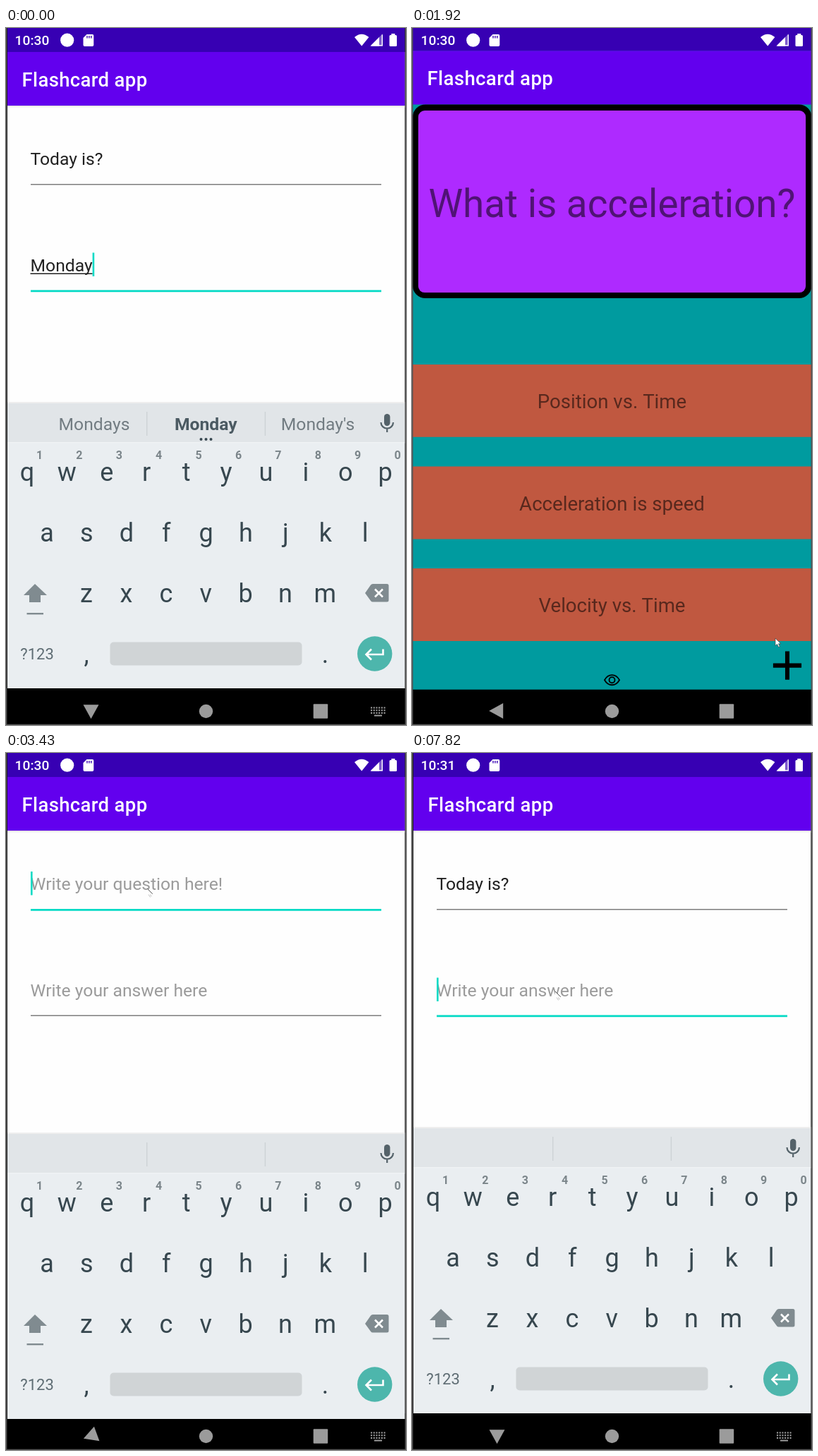
An HTML page with a canvas for the animation above (8 s loop, 567x988 px).

```html
<!DOCTYPE html>
<html lang="en">
<head>
<meta charset="utf-8">
<title>Flashcard app</title>
<style>
  html, body { margin: 0; width: 100%; height: 100%; overflow: hidden; background: #000; }
  canvas { display: block; }
</style>
</head>
<body>
<canvas id="stage" width="567" height="988"></canvas>
<script>
const ctx = document.getElementById('stage').getContext('2d');
const LOOP = 8000;
const KEY_PITCH = 56.4, KEY_COLOR = '#37474f', ICON_GRAY = '#808b90', NAV_GRAY = '#9b9b9b';
const ACCENT = '#03dac5', DIM_TEXT = 'rgba(0,0,0,.54)';

// Each step changes part of the state and holds until the next one.
const steps = [
  [0, { screen: 'edit', zoom: 1, homeZoom: 1, keyboard: 0, backAngle: -90, clock: '10:30',
        question: 'Today is?', answer: 'Monday', focus: 'answer', caret: true,
        words: ['Mondays', 'Monday', "Monday's"], pointer: null, card: '#9f26ea' }],
  [150, { screen: 'home', keyboard: null, backAngle: 0, pointer: [527, 896] }],
  [1640, { card: '#ae2aff' }],
  [1920, { homeZoom: 1.004, pointer: [515, 865], question: '', answer: '', focus: null, caret: false, words: [] }],
  [2070, { screen: 'edit', zoom: .991, homeZoom: 1.047, pointer: [430, 609] }],
  [2190, { zoom: 1, pointer: [370, 510] }],
  [2360, { pointer: [305, 390] }],
  [2530, { pointer: [260, 300] }],
  [2700, { pointer: [228, 238] }],
  [2860, { pointer: [207, 203] }],
  [3010, { pointer: [200, 192] }],
  [3150, { focus: 'question', caret: true }],
  [3430, { keyboard: 8, backAngle: -20 }],
  [3600, { keyboard: 0, backAngle: -85 }],
  [3720, { backAngle: -90, caret: false }],
  [4130, { caret: true }],
  [4390, { question: 'T' }],
  [4520, { words: ['To', 'T', 'The'] }],
  [5050, { question: 'To', caret: false, words: ['Two', 'To', 'Too'] }],
  [5170, { caret: true }],
  [5315, { question: 'Tod' }],
  [5460, { words: ['Todd', 'Tod', 'Today'] }],
  [5605, { question: 'Toda' }],
  [5750, { question: 'Today', words: ['Todays', 'Today', "Today's"] }],
  [5895, { question: 'Today ' }],
  [6040, { words: ['the', 'is', 'for'] }],
  [6580, { question: 'Today i', caret: false, words: ['is', 'I', 'in'] }],
  [6720, { question: 'Today is', caret: true, words: ['its', 'is', 'isn'] }],
  [6870, { question: 'Today is?', words: [] }],
  [7150, { pointer: [200, 210] }],
  [7285, { pointer: [201, 255] }],
  [7420, { pointer: [202, 305] }],
  [7550, { pointer: [203, 335] }],
  [7685, { pointer: [203, 338], clock: '10:31' }],
  [7820, { focus: 'answer' }]
];

function stateAt(time) {
  return Object.assign({}, ...steps.filter(([start]) => start <= time).map(([, change]) => change));
}

function box(x, y, w, h, color, radius = 0) {
  ctx.fillStyle = color;
  ctx.beginPath();
  ctx.roundRect(x, y, w, h, radius);
  ctx.fill();
}

function disc(x, y, r, color) {
  ctx.fillStyle = color;
  ctx.beginPath();
  ctx.arc(x, y, r, 0, 7);
  ctx.fill();
}

function shape(d, color) {
  ctx.fillStyle = color;
  ctx.fill(new Path2D(d));
}

function line(d, color, width) {
  ctx.strokeStyle = color;
  ctx.lineWidth = width;
  ctx.stroke(new Path2D(d));
}

function text(string, x, y, size, color, align = 'left', weight = 400) {
  ctx.font = `${weight} ${size}px Roboto, sans-serif`;
  ctx.textAlign = align;
  ctx.fillStyle = color;
  ctx.fillText(string, x, y);
}

function scaled(factor, draw) {
  ctx.save();
  ctx.translate(283.5, 494);
  ctx.scale(factor, factor);
  ctx.translate(-283.5, -494);
  draw();
  ctx.restore();
}

function appWindow(background) {
  box(2, 0, 563.5, 988, '#000');
  box(2, 34, 563.5, 902, background);
  box(2, 0, 563.5, 34, '#3700b3');
  box(2, 34, 563.5, 76, '#6200ee');
  ctx.letterSpacing = '0.34px';
  text('Flashcard app', 22.6, 82.6, 27.5, '#fff', 'left', 500);
  ctx.letterSpacing = '0px';
}

function homeScreen(state) {
  appWindow('#009b9f');
  box(2, 110, 563.5, 273.5, '#000', 18);
  box(10, 118.5, 547, 257, state.card, 9);
  text('What is acceleration?', 283.5, 268.5, 54.6, DIM_TEXT, 'center');
  ['Position vs. Time', 'Acceleration is speed', 'Velocity vs. Time'].forEach((label, i) => {
    box(2, 477 + 144 * i, 563.5, 102.5, '#c05840');
    text(label, 283.5, 539 + 144 * i, 27.5, DIM_TEXT, 'center');
  });
  line('M511 902H551M531 882V922', '#000', 6);
  line('M273 922.5Q277 915.5 283.5 915.5T294 922.5Q290 929.5 283.5 929.5T273 922.5Z', '#000', 1.8);
  line('M287.5 922.5a4 4 0 1 1-8 0a4 4 0 1 1 8 0', '#000', 1.8);
}

function field(value, hint, y, focused, caret) {
  const left = 34.5;
  text(value || hint, left, y + 194.3, 24.7, value ? '#212121' : '#9b9b9b');
  if (focused) {
    box(35, y + 221, 497, 2.8, ACCENT);
    const word = value.match(/\w*$/)[0];
    const end = left + (value ? ctx.measureText(value).width : .5);
    const wordWidth = ctx.measureText(word).width;
    if (word) box(end - wordWidth, y + 197, wordWidth, 1.4, '#212121');
    if (caret) box(end, y + 168, 2.6, 33.5, ACCENT);
  } else {
    box(35, y + 221, 497, 1.4, '#7d7d7d');
  }
}

function editScreen(state) {
  appWindow('#fefefe');
  box(2, 110, 563.5, 1.2, '#dcdcdc');
  box(2, 111.2, 563.5, 1.5, '#f3f3f3');
  field(state.question, 'Write your question here!', 0, state.focus === 'question', state.caret);
  field(state.answer, 'Write your answer here', 150.5, state.focus === 'answer', state.caret);
  shape('M14 876.5H52L62 886.5V923.5Q62 927.5 58 927.5H14Q10 927.5 10 923.5V880.5Q10 876.5 14 876.5Z', '#000');
  box(16, 882.4, 28.5, 11.2, '#fefefe');
  disc(36, 913.2, 8.6, '#fefefe');
  disc(531, 902, 28.5, '#000');
  line('M518.5 889.5L543.5 914.5M543.5 889.5L518.5 914.5', '#fefefe', 5.6);
}

function keyRow(letters, x, y) {
  [...letters].forEach((letter, i) => text(letter, x + KEY_PITCH * i, y, 36, KEY_COLOR, 'center'));
}

function keyboard(offset, words) {
  ctx.save();
  ctx.translate(0, offset);
  box(2, 530, 563.5, 2, '#eeeeee');
  box(2, 532, 563.5, 456, '#000');
  box(2, 532, 563.5, 404, '#eaeef1');
  box(2, 532, 563.5, 55, '#e1e5e8');
  box(2, 587, 563.5, 1.5, '#f0f3f5');
  [199, 366.7].forEach(x => box(x, 544, 1.4, 34, '#cdd2d5'));
  words.forEach((word, i) => {
    const middle = i === 1;
    text(word, [125, 283.3, 442][i], 570, 24.7, middle ? '#4b5a62' : '#727c82', 'center', middle ? 700 : 400);
  });
  if (words.length) [276.5, 283.5, 290.5].forEach(x => disc(x, 583, 2, KEY_COLOR));

  box(536, 547, 8.4, 17, '#546269', 4.2);
  line('M531.5 559a8.7 8.7 0 0 0 17.4 0M540.2 567V573', '#546269', 2.2);

  keyRow('qwertyuiop', 30, 642);
  keyRow('asdfghjkl', 58, 728);
  keyRow('zxcvbnm', 114, 814);
  [...'1234567890'].forEach((digit, i) =>
    text(digit, 47.5 + KEY_PITCH * i, 611, 16, '#7b858a', 'center', 700));

  shape('M41 788L58 804H49V814H33V804H25Z', ICON_GRAY);
  box(29.5, 829, 23.5, 2.4, ICON_GRAY);
  shape('M509 801L517 789.5Q518 788 520 788H540Q542.5 788 542.5 790.5V811Q542.5 813.5 540 813.5H520Q518 813.5 517 812Z', ICON_GRAY);
  line('M523 795.5L534 806.5M534 795.5L523 806.5', '#fff', 2.6);
  text('?123', 44, 895, 22, '#5f6d74', 'center');
  text(',', 114, 900, 36, KEY_COLOR, 'center');
  text('.', 452.5, 900, 36, KEY_COLOR, 'center');
  box(147.5, 870.5, 272, 33, '#d0d4d6', 5);
  disc(522.7, 887, 24.7, '#4db6ac');
  line('M534.5 880.5V888H511M518 880.5L510.5 888L518 895.5', '#fff', 2.6);
  ctx.restore();
}

function navigationIcons(state) {
  ctx.save();
  ctx.translate(120.5, 968);
  ctx.rotate(state.backAngle * Math.PI / 180);
  shape('M-11.3 0L8.7 -11V11Z', NAV_GRAY);
  ctx.restore();
  disc(283.5, 968.5, 9.7, NAV_GRAY);
  box(435.7, 958.3, 20.5, 20.5, NAV_GRAY, 1);
  if (state.keyboard === null) return;
  for (let row = 0; row < 3; row++)
    for (let col = 0; col < 6; col++)
      box(517 + 3.7 * col, 962.5 + 3.7 * row, 2.1, 2.1, NAV_GRAY);
  box(522, 973.6, 11, 2, NAV_GRAY);
}

function statusIcons(clock) {
  text(clock, 12.6, 24.3, 19.2, '#fff', 'left', 500);
  disc(86.7, 17.2, 9.6, '#fff');
  shape('M114.5 9H122.5Q124.3 9 124.3 11V24Q124.3 26 122.3 26H111.5Q109.5 26 109.5 24V14Z', '#fff');
  [114.3, 117.2, 120.1].forEach(x => box(x, 11, 1.4, 3.6, '#3700b3'));
  shape('M494 13Q504 4.5 514.4 13L504.2 25.5Z', '#fff');
  shape('M534 8V25.5H516.5Z', 'rgba(255,255,255,.35)');
  shape('M529 13V25.5H516.5Z', '#fff');
  line('M533.3 9.5V24.8H518', '#fff', 1.4);
  box(543.5, 10, 10.5, 16, '#fff', 1.5);
  box(546.3, 8, 5, 3, '#fff');
}

function mousePointer([x, y], outlined) {
  ctx.save();
  ctx.translate(x, y);
  const arrow = 'M0 0V10.5L2.6 8.4L4.6 12.6L6.3 11.8L4.5 7.8H7.8Z';
  shape(arrow, '#fff');
  if (outlined) {
    line(arrow, '#333', .6);
  } else {
    line('M0 0L7.8 7.8', '#555', 1);
    line('M2 8.5L4.5 12.5M4.5 8.5L6 11.5', '#b0b0b0', .8);
  }
  ctx.restore();
}

function draw(time) {
  const state = stateAt(time);
  box(0, 0, 567, 988, '#000');
  if (state.screen === 'home') {
    scaled(state.homeZoom, () => homeScreen(state));
  } else {
    if (state.zoom < 1) {
      scaled(state.homeZoom, () => homeScreen(state));
      box(0, 0, 567, 988, 'rgba(0,0,0,.32)');
    }
    scaled(state.zoom, () => editScreen(state));
    if (state.keyboard !== null) keyboard(state.keyboard, state.words);
  }
  statusIcons(state.clock);
  navigationIcons(state);
  if (state.pointer) mousePointer(state.pointer, state.screen === 'home');
  line('M.7 0V987.4H566.3V0', '#505050', 1.4);
}

function tick(now) {
  draw(now % LOOP);
  requestAnimationFrame(tick);
}
requestAnimationFrame(tick);
</script>
</body>
</html>
```
